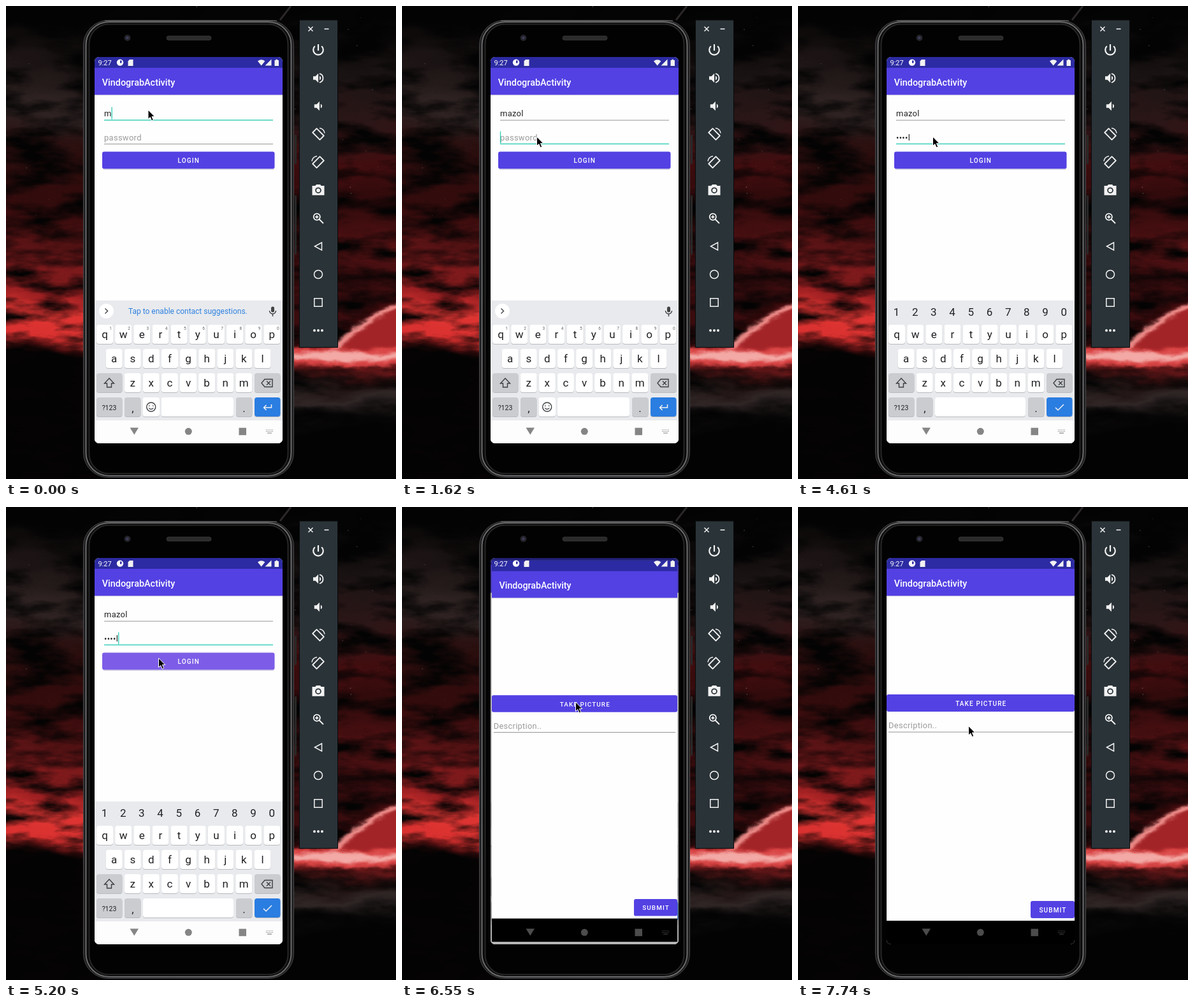
Animation of 612x742 px, one loop 8000 ms. Source, as an HTML page:

```html
<!DOCTYPE html>
<html lang="en">
<head>
<meta charset="utf-8">
<title>Login demo</title>
<style>
html, body { margin: 0; width: 612px; height: 742px; overflow: hidden; background: #040303; }
svg { position: absolute; left: 0; top: 0; will-change: transform; }
text { font-family: Roboto, sans-serif; }
.field { font-size: 12.92px; letter-spacing: .32px; fill: #222; }
.hint { fill: #9a9a9a; }
.title { font-size: 14.4px; font-weight: 500; fill: #fff; }
.label { font-size: 10.05px; font-weight: 500; letter-spacing: 1.1px; fill: #fff; text-anchor: middle; }
.key { font-size: 17px; fill: #202124; text-anchor: middle; }
.sup { font-size: 6.5px; fill: #5f6368; text-anchor: middle; }
.line { fill: none; stroke: #f2f2f2; stroke-width: 1.8; }
.thin { stroke-width: 1.5; }
.solid { fill: #f2f2f2; }
.ink { fill: none; stroke: #3c4043; stroke-width: 1.4; }
</style>
</head>
<body>
<svg width="612" height="742">
  <defs>
    <filter id="cloud" filterUnits="userSpaceOnUse" x="-40" y="-40" width="700" height="830" color-interpolation-filters="sRGB">
      <feTurbulence type="fractalNoise" baseFrequency=".01 .03" numOctaves="5" seed="4" result="noise"/>
      <feDisplacementMap in="SourceGraphic" in2="noise" scale="50" xChannelSelector="R" yChannelSelector="G" result="bands"/>
      <feColorMatrix in="noise" values="0 0 0 0 .01  0 0 0 0 .01  0 0 0 0 .01  0 0 3 0 -1.2" result="shade"/>
      <feMerge><feMergeNode in="bands"/><feMergeNode in="shade"/></feMerge>
    </filter>
    <filter id="rough" filterUnits="userSpaceOnUse" x="430" y="430" width="220" height="180" color-interpolation-filters="sRGB">
      <feGaussianBlur stdDeviation="2" result="soft"/>
      <feTurbulence type="fractalNoise" baseFrequency=".04 .08" numOctaves="3" seed="8"/>
      <feDisplacementMap in="soft" scale="10" xChannelSelector="R" yChannelSelector="G"/>
    </filter>
    <filter id="glow"><feGaussianBlur stdDeviation="9"/></filter>
  </defs>
  <g id="sky" filter="url(#cloud)"></g>
  <path d="M450 548H640V560H450ZM520 540Q560 490 640 465V545Z" fill="#c42c2e" filter="url(#glow)" opacity=".8"/>
  <g filter="url(#rough)">
    <path d="M512 540Q556 494 630 466V550Z" fill="#a32427"/>
    <path d="M514 541Q560 489 630 464" fill="none" stroke="#ef8f8c" stroke-width="8"/>
    <path d="M440 536Q500 535 530 538T630 532V560Q560 572 440 560Z" fill="#d94444"/>
    <path d="M450 545Q520 538 560 544T630 541V553Q560 562 450 554Z" fill="#f3a9a5"/>
  </g>
  <g id="stars" fill="#766"></g>
  <path d="M447 0L430 22" stroke="#2b2727" stroke-width="3"/>
</svg>
<svg id="stage" width="612" height="742"></svg>
<script>
const $ = id => document.getElementById(id);
const PURPLE = '#5341e3', TEAL = '#3fd0ba', GREY = '#8c8c8c', USER = 'mazol';
const rect = (x, y, w, h, fill, r = 0, more = '') =>
  `<rect x="${x}" y="${y}" width="${w}" height="${h}" rx="${r}" fill="${fill}" ${more}/>`;
const text = (x, y, cls, str, more = '') => `<text x="${x}" y="${y}" class="${cls}" ${more}>${str}</text>`;
const path = (d, cls, more = '') => `<path d="${d}" class="${cls}" ${more}/>`;
const place = (x, y, body) => `<g transform="translate(${x} ${y})">${body}</g>`;

// Sky: one vertical gradient on each side of the phone, stops are [y, colour]
const band = (id, x, w, skew, stops) =>
  `<linearGradient id="${id}" gradientUnits="userSpaceOnUse" x1="0" y1="0" x2="0" y2="742">` +
  stops.map(([y, c]) => `<stop offset="${y / 742}" stop-color="${c}"/>`).join('') + '</linearGradient>' +
  rect(x, -40, w, 830, `url(#${id})`, 0, `transform="skewY(${skew})"`);
$('sky').innerHTML =
  band('west', -40, 340, 7, [[20, '#050404'], [90, '#1c1414'], [160, '#2e2222'], [220, '#2a0d0d'], [310, '#350b0c'],
    [390, '#651517'], [445, '#9c1f21'], [475, '#e03633'], [512, '#d8302f'], [532, '#4c0e0f'], [550, '#050303']]) +
  band('east', 300, 360, 0, [[30, '#050404'], [110, '#1c1414'], [180, '#2c1617'], [255, '#420d0f'], [320, '#2a090a'],
    [380, '#5c1315'], [430, '#3a0c0e'], [500, '#3a0c0e'], [555, '#7c1a1c'], [585, '#1c0c0c'], [615, '#302626'],
    [645, '#0a0808'], [670, '#040303']]);
let seed = 7;
const random = () => (seed = seed * 16807 % 2147483647) / 2147483647;
$('stars').innerHTML = Array.from({ length: 60 }, () =>
  `<circle cx="${random() * 612}" cy="${random() * 330}" r="${.3 + random() * .4}"/>`).join('');

const phone =
  rect(453, 202, 3, 46, '#292929', 1) + rect(453, 297, 3, 93, '#292929', 1) +
  rect(121.5, 22.5, 330, 717, '#1d1d1e', 39, 'stroke="#4a4a4c"') +
  rect(125.5, 25, 322, 712, '#0a0a0a', 36, 'stroke="#6a6a6c" stroke-width="2"') +
  rect(130.5, 28.5, 312, 705, '#020202', 31, 'stroke="#262627" stroke-width="2"') +
  path('M155 23H425', '', 'stroke="#777" stroke-width="1.2"') +
  '<circle cx="190.5" cy="50" r="5" fill="#24242a"/><circle cx="190.5" cy="50" r="2.2" fill="#3c3c58"/>' +
  rect(252, 47, 70, 6.5, '#2b2b2b', 3, 'stroke="#3d3d3d" stroke-width=".7"');

const bars = nav =>
  rect(139, 80, 295, 606, '#fefefe') + rect(139, 139, 295, 1.2, '#d9d9de') +
  rect(139, 80, 295, 17.5, '#2c2ba3') + rect(139, 97, 295, 42.3, PURPLE) +
  text(150.8, 124.6, 'title', 'VindograbActivity') + rect(139, 649, 295, 37, nav);

const key = (x, y, w, fill = '#fff') =>
  rect(x, y + 1, w, 30, '#b8babd', 4) + rect(x, y, w, 30, fill, 4);
const letters = (row, x, step, y) => [...row].map((c, i) =>
  key(x + i * step - 13, y, 26) + text(x + i * step, y + 21, 'key', c)).join('');
const digits = (y, cls, dx) => [...'1234567890'].map((c, i) =>
  text(154.5 + dx + i * 29.2, y, cls, c)).join('');
const DARK = '#cacccf';

const keyboard =
  rect(139, 462, 295, 188, '#e8eaed') +
  letters('qwertyuiop', 155, 29.15, 500) + letters('asdfghjkl', 169.7, 29.1, 538) +
  letters('zxcvbnm', 198.7, 29.1, 576) +
  key(142, 576, 40.5, DARK) + path('M162 584l7.5 8h-4v6h-7v-6h-4z', 'ink') +
  key(390, 576, 40.5, DARK) + path('M401 591.5l5-6h12v12h-12zM409 588.5l6 6m0-6l-6 6', 'ink') +
  key(142, 614, 40.5, DARK) + text(162, 633.5, 'key', '?123', 'style="font-size:10.5px"') +
  key(186, 614, 25.5, DARK) + text(199, 637, 'key', ',') +
  key(361, 614, 25.5, DARK) + text(373.5, 637, 'key', '.') +
  key(390, 614, 40.5, '#2a7de1') +
  `<g id="mail">${digits(508, 'sup', 9.5)}
    <circle cx="157.5" cy="478.5" r="11.5" fill="#fff"/>${path('M155.5 474.5l4 4-4 4', 'ink')}
    ${text(192, 483, '', 'Tap to enable contact suggestions.', 'id="tip" font-size="12" fill="#2f80e0"')}
    ${rect(416, 471.5, 5, 9, '#444', 2.5)}${path('M413.5 478a5 5 0 0 0 10 0M418.5 483v4', 'ink')}
    ${key(214.5, 614, 26.5)}${place(227.7, 629, '<circle r="7" class="ink"/>' +
      path('M-3.5 1.5a4 4 0 0 0 7 0M-3-2.6v1.6M3-2.6v1.6', 'ink'))}
    ${key(243.5, 614, 113.5)}
    ${path('M416.5 625v5h-12m4-4l-4 4 4 4', 'line thin')}</g>
  <g id="pin">${digits(486, 'key', 0)}${key(215, 614, 142)}
    ${path('M404 630l4 4 9-9', 'line thin')}</g>`;

const login = `<g id="login">${bars('#fdfdfd')}
  <rect id="rule1" x="154"/><rect id="rule2" x="154"/>
  ${text(154, 173, 'field', '', 'id="user"')}
  ${text(154, 211, 'field hint', 'password', 'id="hint"')}${text(154, 211, 'field', '', 'id="pass"')}
  <rect id="caret" width="1.4" height="19" fill="${TEAL}"/>
  ${rect(152, 230, 269, 27, '#d5d3e3', 3)}${rect(151, 228.5, 270.5, 26.8, PURPLE, 3, 'id="button"')}
  ${text(286.8, 246, 'label', 'LOGIN')}${keyboard}</g>`;

const post = `<g id="post">${bars('#000')}
  ${rect(139, 294, 295, 27, PURPLE, 3)}${text(287.3, 311.7, 'label', 'TAKE PICTURE')}
  ${text(142, 347.3, 'field hint', 'Description..')}${rect(142, 352.6, 289, .9, '#888')}
  ${rect(365, 618, 69, 27, PURPLE, 3)}${text(400, 635.6, 'label', 'SUBMIT')}</g>`;

const status = text(144.5, 92.6, '', '9:27', 'font-size="11" fill="#fff"') +
  '<circle cx="179" cy="88.6" r="5.2" fill="#fff"/>' + rect(179, 85.5, 2.5, 4, '#2c2ba3') +
  path('M194 84h5.5v10h-8v-7.5z', 'solid') +
  path('M395 86.5q5.7-4.5 11.4 0L400.7 93.5zM416.5 83.5v10h-10z', 'solid') +
  path('M421.5 85h2v-1.3h2.5v1.3h2v9h-6.5z', 'solid');

const nav = `<g id="nav">${path('M194.5 661.5h13.5l-6.75 11z', '')}<circle cx="286.3" cy="667.3" r="5.5"/>
  ${rect(365.5, 661.7, 11.5, 11.5, 'inherit')}
  ${path('M408 665h11M408 667.5h11', '', 'stroke-width="1.2" stroke-dasharray="1.3 1.1"')}
  ${path('M410 670h7', '', 'stroke-width="1.2"')}</g>`;

const turn = path('M-8.8-2.5L-2.5-8.8 8.8 2.5 2.5 8.8Z', 'line', 'stroke-linejoin="round"') +
  path('M2-9.5a9.5 9.5 0 0 1 8 8', 'line thin');
const speaker = path('M-8-2.7h3.6l4.5-4.5v14.4l-4.5-4.5h-3.6z', 'solid');
const icons = [
  path('M-5.2-6A7.8 7.8 0 1 0 5.2-6M0-9V1', 'line', 'style="stroke-width:2.2"'),
  speaker + path('M2-3.6a4 4 0 0 1 0 7.2z', 'solid') + path('M2-7a7.2 7.2 0 0 1 0 14', 'line'),
  place(1.8, 0, speaker + path('M2-3.6a4 4 0 0 1 0 7.2z', 'solid')),
  turn,
  `<g transform="scale(-1 1)">${turn}</g>`,
  path('M-9.5-7h4.8l1.7-2h6l1.7 2h4.8v14.8h-19z', 'solid') +
    '<circle cy=".2" r="3.9" fill="#f2f2f2" stroke="#2a3338" stroke-width="1.8"/>',
  '<circle cx="-2.2" cy="-2.2" r="5.1" class="line"/>' + path('M1.5 1.5L8 8M-4.8-2.2h5.2M-2.2-4.8v5.2', 'line'),
  path('M-5.5 0L5.500-6v12z', 'line thin'),
  '<circle r="6.5" class="line thin"/>',
  path('M-6.2-6.2h12.4v12.4h-12.4z', 'line thin'),
  [-6, 0, 6].map(x => `<circle cx="${x}" r="2" class="solid"/>`).join('')
];
const panel = rect(460.5, 22, 60, 513.5, '#2a3338', 0, 'stroke="#080a0b"') +
  path('M474.5 32.5l7 7m0-7l-7 7M499.5 36h7', 'line thin') +
  icons.map((icon, i) => place(490, 69 + i * 44, icon)).join('');

$('stage').innerHTML = `<clipPath id="screen">${rect(139, 80, 295, 606, '#000', 7)}</clipPath>
  ${phone}<g clip-path="url(#screen)">${login}${rect(139, 80, 295, 606, '#000', 0, 'id="dim" opacity=".28"')}
  ${post}${status}${nav}</g>${panel}
  ${path('M0 0V14.5L3.3 11.5 5.7 17 8.2 15.9 5.9 10.5H10.3Z', '', 'id="mouse" fill="#000" stroke="#fff"')}`;

// Each list holds [start time, value...]; a value stays until the next one
const typedUser = [[0, 1], [140, 2], [440, 3], [590, 4], [740, 5]];
const typedPass = [[0, 0], [3560, 1], [3710, 2], [3860, 3], [4010, 4], [4160, 5]];
const caretOn = [[0, 1], [1170, 0], [1320, 1], [2070, 0], [2360, 1], [2810, 0], [3110, 1],
  [4610, 0], [5200, 1], [5650, 0], [6400, 1]];
const tipAlpha = [[0, 1], [1170, .5], [1320, .2], [1470, 0]];
const pointer = [[0, 223, 163], [1040, 222, 168], [1170, 219, 175], [1320, 215, 190], [1470, 212, 202],
  [1620, 211.5, 205], [4760, 215, 210], [4910, 226, 222], [5050, 237, 234], [5200, 239.5, 237],
  [6550, 272.5, 306], [6700, 278, 318], [6850, 282, 330], [7000, 286, 342], [7150, 289, 353],
  [7290, 291, 362], [7440, 293, 369], [7590, 280, 356], [7740, 267.5, 343.5]];
const at = (list, t) => list.findLast(entry => entry[0] <= t).slice(1);

const set = (id, attrs) => { for (const k in attrs) $(id).setAttribute(k, attrs[k]); };
const show = (id, on) => set(id, { display: on ? 'inline' : 'none' });
const zoom = (id, s) => set(id, { transform: `translate(286.5 383) scale(${s}) translate(-286.5 -383)` });
const rule = (id, y, active) => set(id, active
  ? { y: y - .4, width: 265, height: 1.5, fill: TEAL }
  : { y, width: 265, height: .9, fill: GREY });

function draw(t) {
  const onPass = t >= 1320, posting = t >= 6550, settled = t >= 6700;
  const n = at(typedPass, t)[0];
  $('user').textContent = USER.slice(0, at(typedUser, t)[0]);
  $('pass').textContent = n ? '•'.repeat(n - 1) + (t < 5650 ? USER[n - 1] : '•') : '';
  show('hint', !n);
  rule('rule1', 178.7, !onPass);
  rule('rule2', 216, onPass);
  const active = $(onPass ? 'pass' : 'user');
  const width = active.textContent && !settled ? active.getComputedTextLength() : 0;
  set('caret', { x: 153.8 + width, y: onPass ? 196.5 : 158.5, opacity: at(caretOn, t)[0] });
  set('tip', { opacity: at(tipAlpha, t)[0] });
  show('mail', t < 2070);
  show('pin', t >= 2070);
  set('button', { fill: t >= 5200 && t < 5350 ? '#7d5de7' : PURPLE });
  zoom('login', posting ? 1.02 : t >= 6400 ? 1.004 : 1);
  zoom('post', settled ? 1 : .987);
  show('login', !settled);
  show('dim', posting && !settled);
  show('post', posting);
  const tint = posting ? '#4c4c4c' : '#858585';
  set('nav', { fill: tint, stroke: tint, 'stroke-width': 0 });
  const [x, y] = at(pointer, t);
  set('mouse', { transform: `translate(${x} ${y})` });
}

const start = performance.now();
(function frame() {
  draw((performance.now() - start) % 8000);
  requestAnimationFrame(frame);
})();
</script>
</body>
</html>
```
